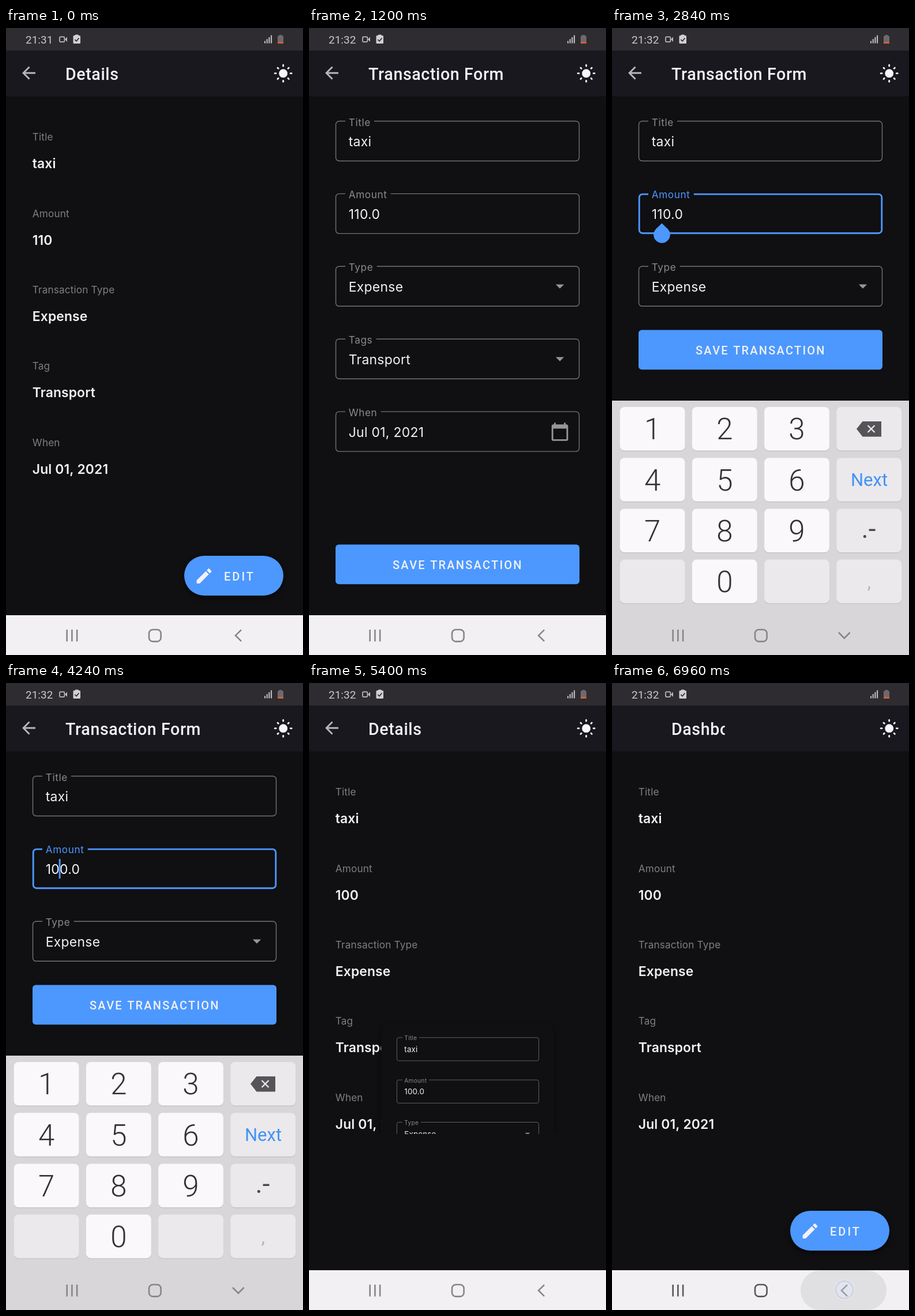
These frames come from a looping animation (515x1087 px, 7000 ms). An HTML page with a canvas:

```html
<!DOCTYPE html>
<html lang="en">
<head>
<meta charset="utf-8">
<title>Transaction editing</title>
<style>
  html, body { margin: 0; width: 100%; height: 100%; overflow: hidden; background: #100f11; }
  canvas { display: block; width: 515px; height: 1087px; }
</style>
</head>
<body>
<canvas id="stage" width="515" height="1087"></canvas>
<script>
const ctx = document.getElementById('stage').getContext('2d');
const W = 515, H = 1087, LOOP = 7000;
const BAR = 119, NAV = 1018, KEY_TOP = 646, KEY_H = NAV - KEY_TOP;
const BLUE = '#4c98ff', BG = '#100f11', LIGHT = '#f2f1f3', GREY = '#969598';
const FAB = { x: 309, y: 915, w: 172, h: 69 };
const DP = 1.4306;

// Moments of the interaction, in ms
const T = {
  clock: 720, openTitle: 770, open: 850, opened: 1170,
  focus: 2380, resize: 2550, keysIn: 2566,
  erase: 3560, type: 4060,
  saved: 5210, keysOut: 5250, close: 5288, closed: 5588,
  navPress: 6790, leave: 6940
};
const TAPS = [
  [570, 860, 400, 950], [2240, 2470, 89, 327], [3480, 3720, 452, 705],
  [3950, 4220, 195, 960], [5030, 5370, 346, 566], [6780, 7200, 403, 1052]
];

const ICON = {
  back: 'M20 11H7.83l5.59-5.59L12 4l-8 8 8 8 1.41-1.41L7.83 13H20v-2z',
  edit: 'M3 17.25V21h3.75L17.81 9.94l-3.75-3.75L3 17.25zM20.71 7.04c.39-.39.39-1.02 0-1.41l-2.34-2.34c-.39-.39-1.02-.39-1.41 0l-1.83 1.83 3.75 3.75 1.83-1.83z',
  date: 'M20 3h-1V1h-2v2H7V1H5v2H4c-1.1 0-2 .9-2 2v16c0 1.1.9 2 2 2h16c1.1 0 2-.9 2-2V5c0-1.1-.9-2-2-2zm0 18H4V8h16v13z'
};
for (const k in ICON) ICON[k] = new Path2D(ICON[k]);

const clamp = v => Math.max(0, Math.min(1, v));
const lerp = (a, b, p) => a + (b - a) * p;
const span = (a, b, v) => clamp((v - a) / (b - a));
const within = (t, a, b) => t >= a && t < b;

// cubic-bezier(.4, 0, .2, 1)
function ease(x) {
  let lo = 0, hi = 1;
  for (let i = 0; i < 24; i++) {
    const s = (lo + hi) / 2, r = 1 - s;
    if (1.2 * s * r * r + .6 * s * s * r + s * s * s < x) lo = s; else hi = s;
  }
  return 3 * lo * lo - 2 * lo * lo * lo;
}

function scoped(draw) { ctx.save(); draw(); ctx.restore(); }

function text(s, x, y, font, color, spacing = 0, align = 'left') {
  ctx.font = font;
  ctx.letterSpacing = spacing + 'px';
  ctx.textAlign = align;
  ctx.fillStyle = color;
  ctx.fillText(s, x, y);
}

function textWidth(s, font, spacing) {
  ctx.font = font;
  ctx.letterSpacing = spacing + 'px';
  return ctx.measureText(s).width;
}

function roundBox(x, y, w, h, r, color) {
  ctx.beginPath();
  ctx.roundRect(x, y, w, h, r);
  if (color) { ctx.fillStyle = color; ctx.fill(); }
}

function rect(x, y, w, h, color) { ctx.fillStyle = color; ctx.fillRect(x, y, w, h); }

function poly(points, fill) {
  ctx.beginPath();
  points.forEach(([x, y]) => ctx.lineTo(x, y));
  if (fill) { ctx.closePath(); ctx.fillStyle = fill; ctx.fill(); } else ctx.stroke();
}

function disc(x, y, r, color) {
  ctx.beginPath();
  ctx.arc(x, y, r, 0, Math.PI * 2);
  ctx.fillStyle = color;
  ctx.fill();
}

function pen(color, width, cap = 'butt') {
  ctx.strokeStyle = color;
  ctx.lineWidth = width;
  ctx.lineCap = cap;
}

function icon(path, cx, cy, color) {
  scoped(() => {
    ctx.translate(cx - 12 * DP, cy - 12 * DP);
    ctx.scale(DP, DP);
    ctx.fillStyle = color;
    ctx.fill(path);
  });
}

const INTER = 'Inter, sans-serif', ROBOTO = 'Roboto, sans-serif';
const LABEL = '400 17.2px ' + INTER, VALUE = '400 22.9px ' + INTER;
const STRONG = '600 22.9px ' + INTER, TITLE = '500 28.6px ' + ROBOTO;
const BUTTON = '500 20px ' + ROBOTO;

function statusBar(t) {
  rect(0, 0, W, 39, '#2e2c30');
  text(t < T.clock ? '21:31' : '21:32', 34, 26.7, '400 19px ' + ROBOTO, '#c9c8ca');
  pen('#bdbcbe', 1.7);
  roundBox(93, 15.3, 8.4, 8.8, 1.5);
  ctx.stroke();
  poly([[102, 19.7], [106, 15.6], [106, 24]], '#bdbcbe');
  roundBox(116.5, 13, 12.5, 14, 1.5, '#d0cfd1');
  roundBox(119.5, 11.5, 6.5, 4, 1.5, '#d0cfd1');
  pen('#2e2c30', 1.7);
  poly([[119.3, 20], [122, 22.8], [126.5, 17.5]]);
  for (let i = 0; i < 4; i++) {
    const h = 4 + i * 3.3;
    rect(448 + i * 3.7, 26.5 - h, 2, h, '#c3c2c4');
  }
  roundBox(471, 13.5, 10, 13.5, 1.5, '#6b6a6c');
  rect(473.5, 12, 5, 2, '#6b6a6c');
  rect(471, 24, 10, 3, '#cf5f3c');
}

function appBar(t) {
  rect(0, 39, W, 79.5, '#1a181f');
  if (t < T.leave) {
    icon(ICON.back, 39.5, 78, '#b9b8bb');
    const form = within(t, T.openTitle, T.saved);
    text(form ? 'Transaction Form' : 'Details', 103, 90, TITLE, LIGHT, .6);
  } else scoped(() => {
    ctx.beginPath();
    ctx.rect(103, 60, textWidth('Details', TITLE, .6), 50);
    ctx.clip();
    text('Dashboard', 103, 90, TITLE, LIGHT, .6);
  });
  disc(480.7, 78.7, 7.4, '#f7f6f8');
  pen('#f7f6f8', 2.8, 'round');
  for (let i = 0; i < 8; i++) {
    const a = i * Math.PI / 4, r0 = i % 2 ? 11.9 : 12.6, r1 = i % 2 ? 13.7 : 14.5;
    const c = Math.cos(a), s = Math.sin(a);
    poly([[480.7 + r0 * c, 78.7 + r0 * s], [480.7 + r1 * c, 78.7 + r1 * s]]);
  }
}

function fab() {
  const { x, y, w, h } = FAB;
  scoped(() => {
    ctx.shadowColor = 'rgba(0,0,0,.5)';
    ctx.shadowBlur = 8;
    ctx.shadowOffsetY = 4;
    roundBox(x, y, w, h, h / 2, BLUE);
  });
  icon(ICON.edit, 343.5, 950, LIGHT);
  text('EDIT', 378, 957.5, BUTTON, LIGHT, 3);
}

function details(t) {
  const rows = [
    ['Title', 'taxi'], ['Amount', t < T.type ? '110' : '100'],
    ['Transaction Type', 'Expense'], ['Tag', 'Transport'], ['When', 'Jul 01, 2021']
  ];
  rows.forEach(([label, value], i) => {
    const y = i * 132.3;
    text(label, 45.8, 195.3 + y, LABEL, '#7f7e81', .15);
    text(value, 45.8, 243.3 + y, STRONG, LIGHT, .1);
  });
}

function field(label, value, y, focused) {
  const x0 = 46.5, x1 = 468.5, bottom = y + 69, r = 5.7;
  const gap = 75 + textWidth(label, LABEL, .6);
  pen(focused ? BLUE : '#737276', focused ? 2.9 : 1.4);
  const inset = focused ? .7 : 0;
  const l = x0 + inset, rt = x1 - inset, tp = y + inset, bt = bottom - inset;
  ctx.beginPath();
  ctx.moveTo(gap, tp);
  ctx.arcTo(rt, tp, rt, bt, r);
  ctx.arcTo(rt, bt, l, bt, r);
  ctx.arcTo(l, bt, l, tp, r);
  ctx.arcTo(l, tp, gap, tp, r);
  ctx.lineTo(63, tp);
  ctx.stroke();
  text(label, 68.7, y + 8, LABEL, focused ? BLUE : '#8b8a8d', .6);
  text(value, 68.7, y + 43.5, VALUE, LIGHT, .3);
}

function caret(t, amount, count) {
  const x = 68.7 + textWidth(amount.slice(0, count), VALUE, .3);
  const blinkOff = within(t, 2820, 3320) || within(t, 4560, 5060);
  if (!blinkOff) rect(x - 1.4, 305, 2.9, 34, BLUE);
  if (t < T.erase) {
    const hx = x - 1.5;
    disc(hx, 358.5, 14.3, BLUE);
    poly([[hx, 338.5], [hx + 10.8, 349], [hx - 10.8, 349]], BLUE);
  }
}

function form(t) {
  const compact = t >= T.resize;
  const focused = within(t, T.focus, T.saved);
  const amount = t < T.erase ? '110.0' : t < T.type ? '10.0' : '100.0';
  const rows = [
    ['Title', 'taxi'], ['Amount', amount], ['Type', 'Expense'],
    ['Tags', 'Transport'], ['When', 'Jul 01, 2021']
  ];
  rows.slice(0, compact ? 3 : 5).forEach(([label, value], i) => {
    const y = 161.5 + i * 125.9;
    field(label, value, y, focused && i === 1);
    if (i === 2 || i === 3)
      poly([[427.8, y + 31.3], [442.2, y + 31.3], [435, y + 38.5]], GREY);
    if (i === 4) icon(ICON.date, 435, y + 35, GREY);
  });
  if (focused) caret(t, amount, within(t, T.erase, T.type) ? 1 : 2);
  const y = compact ? 523.5 : 895.5;
  roundBox(46, y, 423, 68.7, 5.7, BLUE);
  text('SAVE TRANSACTION', 145, y + 42.3, BUTTON, LIGHT, 2.25);
}

// Arc between the full form (k = 0) and the button (k = 1), by path length
const arcPoint = u => [lerp(W / 2, FAB.x + FAB.w / 2, u * u), lerp(BAR, FAB.y, 2 * u - u * u)];
const ARC = [0];
for (let i = 1; i <= 80; i++) {
  const [ax, ay] = arcPoint((i - 1) / 80), [bx, by] = arcPoint(i / 80);
  ARC.push(ARC[i - 1] + Math.hypot(bx - ax, by - ay));
}
function alongArc(k) {
  const want = k * ARC[80];
  const i = Math.max(1, ARC.findIndex(d => d >= want));
  return arcPoint((i - 1 + span(ARC[i - 1], ARC[i], want)) / 80);
}

function morph(t, entering) {
  const p = ease(entering ? span(T.open, T.opened, t) : span(T.close, T.closed, t));
  const size = entering ? 1 - span(.1, 1, p) : span(0, .9, p);
  const mask = entering ? 1 - span(.1, 1, p) : span(.2, .9, p);
  const round = entering ? 1 - span(.1, .9, p) : span(.2, .9, p);
  const shown = entering ? span(.1, .4, p) : 1 - span(.6, .9, p);
  const [cx, top] = alongArc(entering ? 1 - p : p);
  const w = lerp(W, FAB.w, size);
  const fullH = (entering ? NAV : KEY_TOP) - BAR;
  const h = lerp(fullH * w / W, FAB.h * w / FAB.w, mask);
  const left = cx - w / 2;
  scoped(() => {
    ctx.shadowColor = 'rgba(0,0,0,.45)';
    ctx.shadowBlur = 10;
    ctx.shadowOffsetY = 4;
    roundBox(left, top, w, h, 34.5 * round, shown < 1 ? BLUE : BG);
  });
  scoped(() => {
    roundBox(left, top, w, h, 34.5 * round);
    ctx.clip();
    if (shown < 1) scoped(() => {
      ctx.translate(left, top);
      ctx.scale(w / FAB.w, w / FAB.w);
      ctx.translate(-FAB.x, -FAB.y);
      fab();
    });
    ctx.globalAlpha = shown;
    rect(left, top, w, h, BG);
    ctx.translate(left, top);
    ctx.scale(w / W, w / W);
    ctx.translate(0, -BAR);
    form(t);
  });
}

function content(t, bottom) {
  scoped(() => {
    ctx.beginPath();
    ctx.rect(0, BAR, W, bottom - BAR);
    ctx.clip();
    if (within(t, T.opened, T.close)) form(t);
    else {
      details(t);
      if (within(t, T.open, T.opened)) morph(t, true);
      else if (within(t, T.close, T.closed)) morph(t, false);
      else fab();
    }
  });
}

function keyboard(t, offset, alpha) {
  scoped(() => {
    ctx.globalAlpha = alpha;
    ctx.translate(0, offset);
    rect(0, KEY_TOP, W, H - KEY_TOP, '#d8d6d9');
    for (let i = 0; i < 16; i++) {
      const col = i % 4, row = i >> 2;
      const x = 13.7 + col * 125.2, y = 657 + row * 88.2, cx = x + 56.4;
      const plain = col < 3 && (row < 3 || col === 1);
      const pressed = i === 13 && within(t, 3980, 4180);
      roundBox(x, y + 1.4, 112.8, 75.6, 8, '#c5c3c6');
      roundBox(x, y, 112.8, 75.6, 8, pressed ? '#cfcdd1' : plain ? '#faf8fb' : '#ebe9ec');
      if (plain)
        text(row < 3 ? row * 3 + col + 1 : 0, cx, y + 56.3, '300 51px ' + ROBOTO, '#333135', 0, 'center');
    }
    poly([[424, 695], [434.5, 682], [467, 682], [467, 708.5], [434.5, 708.5]], '#565458');
    pen('#ebe9ec', 2.3);
    poly([[443.5, 689], [455.5, 701]]);
    poly([[455.5, 689], [443.5, 701]]);
    text('Next', 446, 794, '400 31px ' + ROBOTO, '#4193f5', 0, 'center');
    text('.-', 445, 884, '400 46px ' + ROBOTO, '#4b494d', 0, 'center');
    text(',', 446, 971, '400 32px ' + ROBOTO, '#b5b3b6', 0, 'center');
  });
}

function navIcons(t) {
  const press = span(T.navPress, T.leave, t);
  if (press) scoped(() => {
    const half = lerp(34, 74.5, press);
    ctx.globalAlpha = press;
    roundBox(401.5 - half, 1018.5, half * 2, 68.5, 34, '#e0dfe2');
  });
  const shade = Math.round(lerp(135, 88, press));
  pen(`rgb(${shade},${shade - 2},${shade + 2})`, 2.6);
  for (const x of [105.7, 114.4, 123.1]) poly([[x, 1043], [x, 1063.5]]);
  roundBox(248, 1043, 20.6, 20.6, 6.5);
  ctx.stroke();
  const down = within(t, T.resize, T.saved);
  poly(down ? [[393, 1048], [402.8, 1057.8], [412.6, 1048]]
            : [[408, 1043.3], [398, 1053.2], [408, 1063.1]]);
}

function touches(t) {
  for (const [from, to, x, y] of TAPS) {
    if (!within(t, from, to)) continue;
    scoped(() => {
      ctx.globalAlpha = Math.min(span(from, from + 70, t), 1 - span(to - 110, to, t));
      disc(x, y, 19, 'rgba(255,255,255,.1)');
      disc(x, y, 15, 'rgba(225,232,250,.42)');
      pen('rgba(150,165,200,.4)', 1.4);
      ctx.stroke();
    });
  }
}

function render(t) {
  let offset = KEY_H, alpha = 0;
  if (within(t, T.keysIn, T.keysOut)) {
    alpha = span(T.keysIn, T.keysIn + 200, t);
    offset = KEY_H * Math.pow(1 - alpha, 5.5);
  } else if (t >= T.keysOut) {
    alpha = 1 - span(T.keysOut, T.keysOut + 130, t);
    offset = KEY_H * Math.pow(span(T.keysOut, T.keysOut + 220, t), 2.68);
  }
  rect(0, 0, W, H, BG);
  content(t, KEY_TOP + offset);
  statusBar(t);
  appBar(t);
  rect(0, NAV, W, H - NAV, '#f2f0f3');
  if (alpha) keyboard(t, offset, alpha);
  navIcons(t);
  touches(t);
}

const start = performance.now();
function tick() {
  render((performance.now() - start) % LOOP);
  requestAnimationFrame(tick);
}
tick();
</script>
</body>
</html>
```
